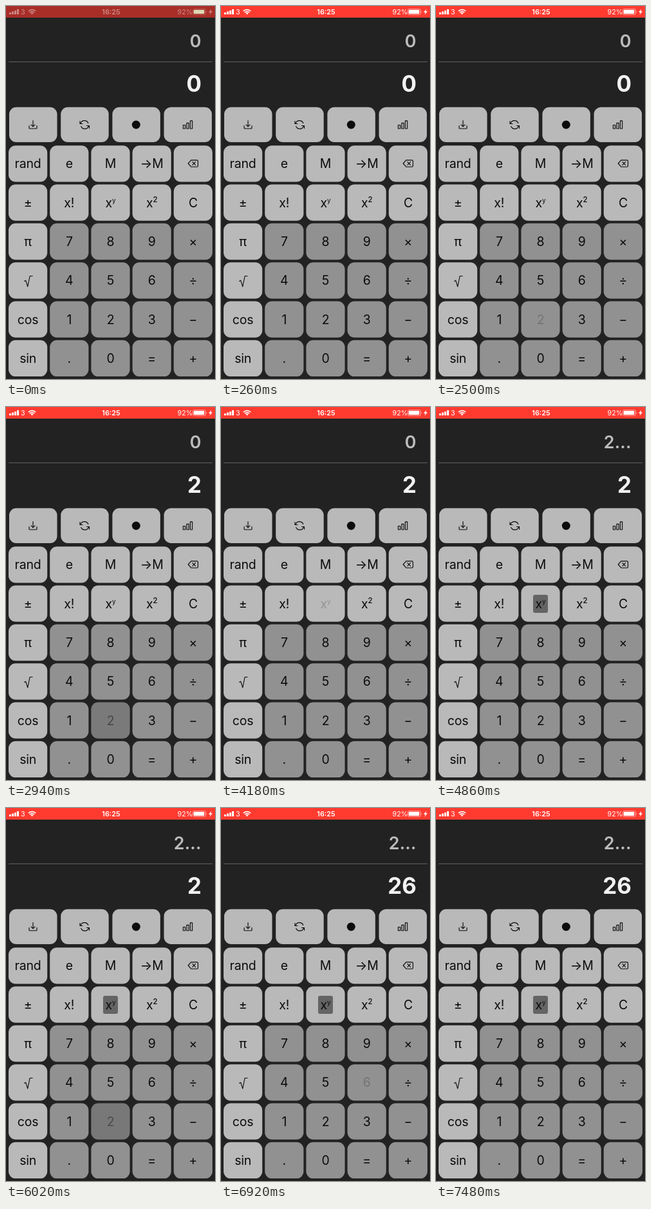
Write an HTML page that moves like this. It is 325 by 578 pixels and loops after 8000 ms.

```html
<!DOCTYPE html>
<html lang="en">
<head>
<meta charset="utf-8">
<title>Calculator</title>
<style>
  html, body { margin: 0; width: 100%; height: 100%; overflow: hidden; background: #222; }
  svg { display: block; width: 100%; height: 100%; font-family: Inter, "Liberation Sans", sans-serif; }
  .light { fill: #b9b9b9; }
  .dark { fill: #919191; }
  .label { font-size: 19.5px; letter-spacing: -.2px; text-anchor: middle; fill: #0c0c0c; }
  .line { fill: none; stroke: #0c0c0c; stroke-width: 1.15; stroke-linecap: round; stroke-linejoin: round; }
  .upper { font-size: 27px; font-weight: 600; text-anchor: end; fill: #bcbcbc; }
  .lower { font-size: 35px; font-weight: 700; text-anchor: end; fill: #f2f2f2; }
  .status { font-size: 10.8px; fill: #fff; }
  .flash { fill: #000; opacity: 0; }

  .bar { animation: bar 8s linear infinite; }
  .status { animation: status 8s linear infinite; }
  .charge { animation: charge 8s linear infinite; }
  @keyframes bar { 0%, .25% { fill: #a92e28; } 3.25%, 100% { fill: #ff3b30; } }
  @keyframes status { 0%, .25% { opacity: .42; } 3.25%, 100% { opacity: 1; } }
  @keyframes charge { 0%, .25% { fill: #dcd8b4; } 3.25%, 100% { fill: #fff; } }

  .key-2 .face { animation: dim-2 8s ease-in-out infinite; }
  .key-2 .flash { animation: flash-2 8s linear infinite; }
  @keyframes dim-2 {
    0%, 31.24% { opacity: 1; }
    31.25%, 34.25% { opacity: .22; }
    40.75%, 71.24% { opacity: 1; }
    71.25%, 73.25% { opacity: .22; }
    79.25%, 100% { opacity: 1; }
  }
  @keyframes flash-2 {
    0%, 34.25% { opacity: 0; }
    36.25% { opacity: .17; }
    40.75%, 73.25% { opacity: 0; }
    75.25% { opacity: .17; }
    79.25%, 100% { opacity: 0; }
  }

  .key-pow .face { animation: dim-pow 8s ease-in-out infinite; }
  .key-pow .flash { animation: flash-pow 8s linear infinite; }
  .picked { animation: picked 8s linear infinite; }
  @keyframes dim-pow {
    0%, 52.24% { opacity: 1; }
    52.25%, 55.25% { opacity: .22; }
    60.75%, 100% { opacity: 1; }
  }
  @keyframes flash-pow {
    0%, 55.25% { opacity: 0; }
    57.25% { opacity: .17; }
    60.75%, 100% { opacity: 0; }
  }
  @keyframes picked { 0%, 55.25% { opacity: 0; } 57.25%, 100% { opacity: 1; } }

  .key-6 .face { animation: dim-6 8s ease-in-out infinite; }
  .key-6 .flash { animation: flash-6 8s linear infinite; }
  @keyframes dim-6 {
    0%, 83.49% { opacity: 1; }
    83.5%, 86.5% { opacity: .22; }
    90.75%, 100% { opacity: 1; }
  }
  @keyframes flash-6 {
    0%, 86.5% { opacity: 0; }
    88.25% { opacity: .17; }
    90.75%, 100% { opacity: 0; }
  }

  .upper-a { animation: upper-a 8s step-end infinite; }
  .upper-b { animation: upper-b 8s step-end infinite; }
  .lower-a { animation: lower-a 8s step-end infinite; }
  .lower-b { animation: lower-b 8s step-end infinite; }
  .lower-c { animation: lower-c 8s step-end infinite; }
  @keyframes upper-a { 0% { opacity: 1; } 55.25%, 100% { opacity: 0; } }
  @keyframes upper-b { 0% { opacity: 0; } 55.25%, 100% { opacity: 1; } }
  @keyframes lower-a { 0% { opacity: 1; } 34.25%, 100% { opacity: 0; } }
  @keyframes lower-b { 0% { opacity: 0; } 34.25% { opacity: 1; } 86.5%, 100% { opacity: 0; } }
  @keyframes lower-c { 0% { opacity: 0; } 86.5%, 100% { opacity: 1; } }
</style>
</head>
<body>
<svg viewBox="0 0 325 578" preserveAspectRatio="none">
  <rect width="325" height="578" fill="#222"/>

  <rect class="bar" width="325" height="18"/>
  <g class="status">
    <path d="M5 10h3v3h-3zM9 8.5h3v4.500h-3zM13 7h3v6h-3zM17 5h3v8h-3z"/>
    <text x="23" y="13">3</text>
    <g fill="none" stroke="#fff" stroke-width="1.7">
      <path d="M34.800 8a8 8 0 0 1 11.400 0M36.900 10.200a5 5 0 0 1 7.200 0"/>
    </g>
    <path d="M40.500 13.300l-2 -2.100a2.900 2.900 0 0 1 4 0z"/>
    <text x="163.500" y="13" text-anchor="middle" font-weight="600">16:25</text>
    <text x="266.500" y="13">92%</text>
    <rect x="290.500" y="4.700" width="20" height="8.600" rx="2" fill="none" stroke="#fff" stroke-width=".8" opacity=".7"/>
    <path d="M311.600 7.500q1.600 1.500 0 3z" opacity=".7"/>
    <path d="M319.500 4.500l-4.500 5.200h2.800l-1.300 4 4.600 -5.400h-2.800z"/>
  </g>
  <rect class="charge" x="291.800" y="6" width="16.600" height="6" rx="1"/>

  <text class="upper upper-a" x="303.500" y="64">0</text>
  <text class="upper upper-b" x="303.500" y="64">2...</text>
  <rect x="4" y="86" width="317" height="1" fill="#606060"/>
  <text class="lower lower-a" x="304" y="132.500">0</text>
  <text class="lower lower-b" x="304" y="132.500">2</text>
  <text class="lower lower-c" x="304" y="132.500">26</text>

  <g id="keys"></g>

  <g class="line">
    <path d="M36 185.500v3.500q0 1 1 1h10q1 0 1 -1v-3.500M42 177.500v9M39 183.800l3 3 3 -3"/>
    <path d="M115 178.500v4h4M129.500 189.500v-4h-4M116 182a6.300 6.300 0 0 1 11.800 -.500M128.500 186a6.300 6.300 0 0 1 -11.800 .600"/>
    <path d="M275.500 184.500h3.200v5.500h-3.200zM281 181.300h3.200v8.700h-3.200zM286.500 177.800h3.200v12.200h-3.200z"/>
    <path d="M287.800 238.800h9q1.700 0 1.700 1.700v7q0 1.700 -1.700 1.700h-9l-4.500 -5.200zM290 241.700l4.600 4.600M294.600 241.700l-4.600 4.600"/>
    <path d="M28.500 426.500l2.200 -1.200 3 9.500 3.400 -16.300h4"/>
  </g>
  <circle cx="202.300" cy="184" r="6.500" fill="#0c0c0c"/>
</svg>
<script>
  const rows = [
    ["rand", "e", "M", "→M", ""],
    ["±", "x!", "pow", "sq", "C"],
    ["π", "7", "8", "9", "×"],
    ["", "4", "5", "6", "÷"],
    ["cos", "1", "2", "3", "−"],
    ["sin", ".", "0", "=", "+"]
  ];
  const faces = {
    pow: 'x<tspan font-size="10" dy="-7">y</tspan>',
    sq: 'x<tspan font-size="11.5" font-weight="500" dy="-7.500">2</tspan>'
  };

  const box = (cls, x, y, w, h) =>
    `<rect class="${cls}" x="${x}" y="${y}" width="${w}" height="${h}" rx="11"/>`;

  function key(name, col, row) {
    const x = 4 + col * 64.2, y = 216.2 + row * 60.32;
    const tone = row < 2 || col === 0 ? "light" : "dark";
    const picked = name === "pow"
      ? '<rect class="picked" x="151" y="291" width="23" height="28" rx="3" fill="#646464"/>' : "";
    const live = ["2", "6", "pow"].includes(name);
    return `<g class="${live ? "key-" + name : ""}">` +
      box(tone, x, y, 60.2, 56.3) +
      (live ? box("flash", x, y, 60.2, 56.3) : "") + picked +
      `<text class="label face" x="${x + 30.1}" y="${y + 35.2}">${faces[name] || name}</text></g>`;
  }

  const tools = [0, 1, 2, 3].map(i => box("light", 5 + i * 80.2, 156.7, 74.5, 54.3));
  const pad = rows.flatMap((names, row) => names.map((name, col) => key(name, col, row)));
  document.getElementById("keys").innerHTML = tools.concat(pad).join("");
</script>
</body>
</html>
```
